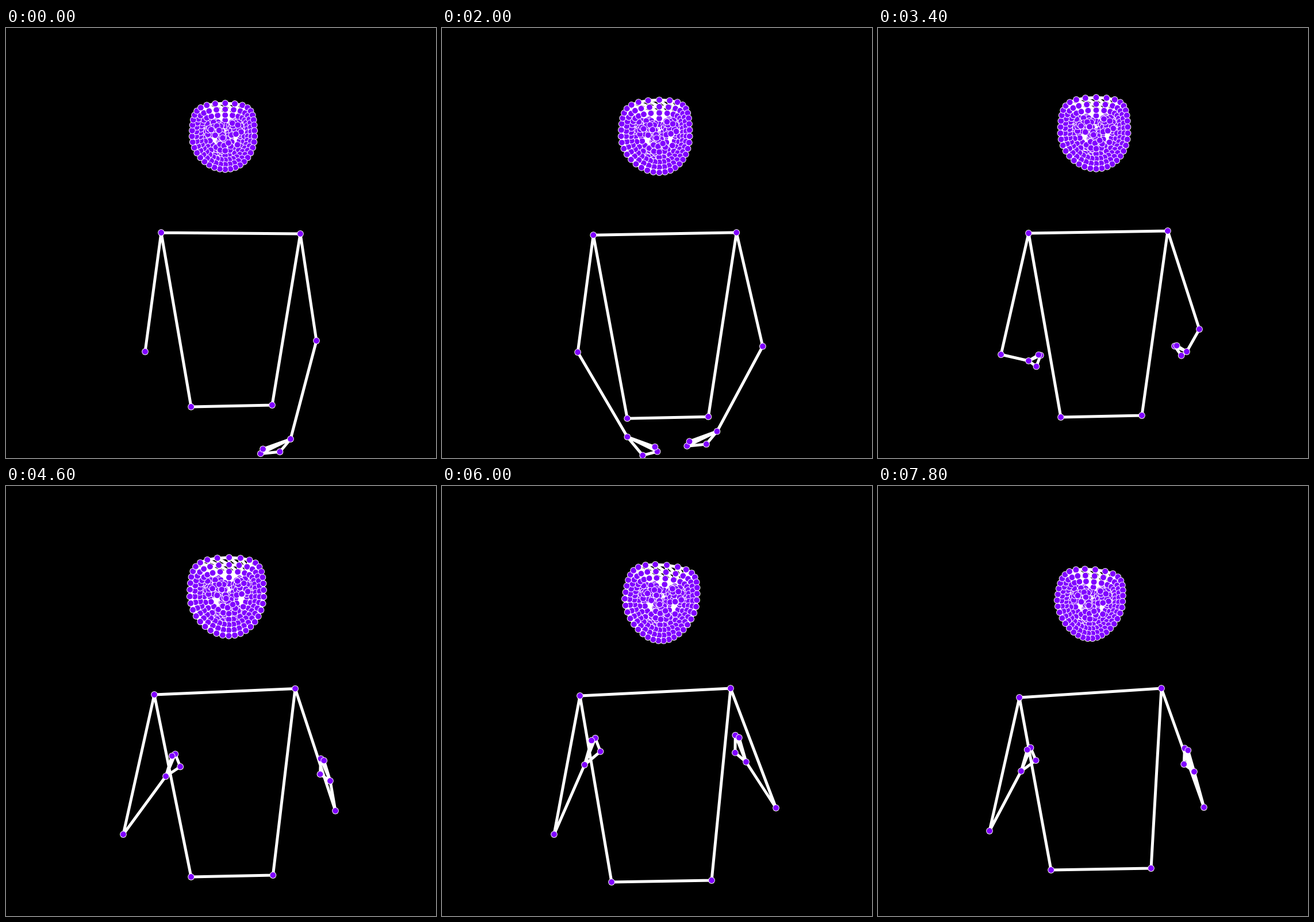
An HTML page with a canvas that plays this animation: 748x748 px, repeating every 8 s.

```html
<!DOCTYPE html>
<html lang="en">
<head>
<meta charset="utf-8">
<title>Body tracking</title>
<style>
  html, body { margin: 0; width: 100%; height: 100%; overflow: hidden; background: #000; }
  canvas { display: block; }
</style>
</head>
<body>
<canvas id="stage" width="748" height="748"></canvas>
<script>
const SIZE = 748, LOOP = 8, STEP = .2;
const ctx = document.getElementById('stage').getContext('2d');
ctx.lineCap = ctx.lineJoin = 'round';

// A path runs straight through a few keys: seconds, then values
const path = (...keys) => t => {
  const next = keys.findIndex(key => key[0] > t);
  if (next < 0) return keys.at(-1).slice(1);
  const a = keys[next - 1], b = keys[next], k = (t - a[0]) / (b[0] - a[0]);
  return a.slice(1).map((v, i) => v + (b[i + 1] - v) * k);
};
const ease = (t, from, to) => {
  const k = Math.min(1, Math.max(0, (t - from) / (to - from)));
  return k * k * (3 - 2 * k);
};
const polar = (length, degrees) => {
  const a = degrees * Math.PI / 180;
  return [length * Math.cos(a), length * Math.sin(a)];
};
const add = (p, [x, y], side = 1) => [p[0] + side * x, p[1] + y];

const shoulderLeft = path([0, 270, 356], [1.2, 264, 362], [3.4, 262, 357], [4.6, 258, 363], [6, 240, 365], [7.8, 246, 368]);
const shoulderRight = path([0, 512, 358], [1.2, 510, 353], [2.6, 514, 358], [3.4, 504, 353], [6, 502, 352], [7.8, 493, 352]);
const hipLeft = path([0, 322, 659], [1.2, 320, 662], [2.6, 324, 692], [3.4, 318, 677], [4.6, 322, 680], [6, 295, 689], [7.2, 298, 686], [7.8, 301, 668]);
const elbowLeft = path([0, 242, 563], [1.2, 243, 572], [2.6, 231, 558], [3.4, 214, 568], [4.6, 204, 606], [6, 195, 606], [7.8, 194, 600]);
const elbowRight = path([0, 540, 544], [1.2, 543, 548], [2.6, 569, 558], [3.4, 559, 524], [4.6, 573, 565], [6, 581, 560], [7.8, 567, 559]);
const wristLeft = path([0, 292, 764], [1.2, 307, 745], [2.6, 334, 686], [3.4, 262, 579], [4.6, 278, 505], [6, 248, 485], [7.8, 249, 496]);
const wristRight = path([0, 495, 715], [1.2, 483, 728], [2.6, 475, 682], [3.4, 537, 563], [4.6, 564, 513], [6, 529, 480], [7.8, 550, 497]);
// Length and angle of both hands
const handPose = path([0, 58, 26], [2.6, 58, 26], [3.4, 23, -25], [4.6, 42, -67], [6, 50, -68], [7.8, 44, -68]);
// Centre and half height
const headPose = path([0, 378, 188.5, 57.5], [1.2, 366, 193.5, 65], [2.6, 375, 184.5, 61.5], [3.4, 376, 183, 62], [4.6, 384, 192.5, 68], [6, 380, 203, 66], [7.8, 368, 205, 60]);

const inside = p => p[1] < SIZE;

function disc([x, y], r, color) {
  ctx.fillStyle = color;
  ctx.beginPath();
  ctx.arc(x, y, r, 0, 2 * Math.PI);
  ctx.fill();
}

function dot(p, color = '#8000ff') {
  if (!inside(p)) return;
  disc(p, 5.9, '#fff');
  disc(p, 4.9, color);
}

function links(list, color = '#fff') {
  ctx.strokeStyle = color;
  ctx.lineWidth = 5;
  ctx.beginPath();
  for (const [a, b] of list) {
    if (!inside(a) || !inside(b)) continue;
    ctx.moveTo(...a);
    ctx.lineTo(...b);
  }
  ctx.stroke();
}

const chain = points => points.slice(1).map((p, i) => [points[i], p]);

// Face in unit coordinates: a broad forehead above, a round jaw below
const range = (n, make) => Array.from({ length: n }, (_, i) => make(i));
const ovalRing = (scale, count) => range(count, i => {
  const a = 2 * Math.PI * i / count, s = Math.sin(a), c = Math.cos(a);
  return c > 0
    ? [scale * Math.tanh(1.75 * s) / Math.tanh(1.75), -c * scale ** 1.6]
    : [scale * s, -c * scale ** 1.2];
});

let seed = 7;
const random = () => (seed = seed * 16807 % 2147483647) / 2147483647;
const jitter = () => (random() - .5) * .06;

const outerRings = [1, .88, .76].map(s => ovalRing(s, 36));
const innerPoints = [...ovalRing(.64, 24), ...ovalRing(.5, 20)];
const feature = (x, y, rx, ry, count) => {
  for (const k of [1, .78, .56, .34]) {
    innerPoints.push(...range(count, i => {
      const [c, s] = polar(k, 360 * (i + .3) / count);
      return [x + rx * c + jitter(), y + ry * s + jitter()];
    }));
  }
};
feature(-.39, -.25, .32, .21, 16);
feature(.39, -.25, .32, .21, 16);
feature(0, .12, .2, .2, 11);
feature(0, .47, .4, .25, 20);
for (let i = innerPoints.length - 1; i > 0; i--) {
  const j = Math.floor(random() * (i + 1));
  [innerPoints[i], innerPoints[j]] = [innerPoints[j], innerPoints[i]];
}

function drawFace(t) {
  const [cx, cy, ry] = headPose(t), rx = ry * .945;
  const yaw = .06 + .14 * ease(t, 0, 1.2) * (1 - ease(t, 1.2, 2.6));
  const roll = .11 * ease(t, 4.4, 6), taper = .02 + .13 * ease(t, 3.8, 6);
  const cos = Math.cos(roll), sin = Math.sin(roll);
  const place = ([u, v]) => {
    const x = (u * (1 - taper * Math.max(v, 0)) + yaw * (1 - u * u)) * rx, y = v * ry;
    return [cx + x * cos - y * sin, cy + x * sin + y * cos];
  };
  const rings = outerRings.map(ring => ring.map(place));

  ctx.fillStyle = '#fff';
  ctx.beginPath();
  rings[2].forEach(p => ctx.lineTo(...p));
  ctx.fill();

  const mesh = [];
  rings.forEach((ring, r) => ring.forEach((p, i) => {
    const j = (i + 1) % ring.length, deeper = rings[r + 1];
    mesh.push([p, ring[j]]);
    if (deeper) mesh.push([p, deeper[i]], [p, deeper[j]]);
  }));
  links(mesh);

  innerPoints.forEach(p => dot(place(p)));
  rings.reverse().flat().forEach(p => dot(p));
}

// Detailed hand: a curling thumb and four bent fingers on an even row of knuckles
function drawTrackedHand(wrist) {
  const root = add(wrist, [10, -12]);
  const thumb = [root];
  for (let j = 0; j < 4; j++) thumb.push(add(thumb[j], polar(42 - 8 * j, 174 - 20 * j).map((v, i) => i ? -v + 2 * polar(42 - 8 * j, 174 - 20 * j)[1] * (j === 0 ? 0 : 1) : v)));
  const fingers = range(4, n => {
    const joints = [add(root, [-76 + 18.3 * n, 32 + 8 * n])], size = 1 - .08 * n;
    for (let j = 0; j < 3; j++) joints.push(add(joints[j], [-23 * size * .65 ** j, 21 * size * .3 ** j]));
    return joints;
  });
  const knuckles = fingers.map(f => f[0]);
  links([...chain(thumb), ...fingers.flatMap(chain), ...chain([root, ...knuckles, root])], '#f00');
  [...thumb, ...fingers.flat()].forEach(p => dot(p, '#ff0'));
}

// Pinky, index and thumb; a foreshortened hand spreads wider
function handTips(t, wrist, side) {
  const [length, angle] = handPose(t);
  const tip = (reach, turn) => add(wrist, polar(length * reach, angle + turn), side);
  return [tip(side > 0 ? .72 : .5, 1400 / length), tip(1, 0), tip(.88, -6)];
}

function drawBody(t) {
  const hipL = hipLeft(t), hipR = add(hipL, [141 + 33 * ease(t, 4.4, 6), -3]);
  const arms = [
    [shoulderLeft(t), elbowLeft(t), wristLeft(t), hipL, 1],
    [shoulderRight(t), elbowRight(t), wristRight(t), hipR, -1]
  ];
  if (t > 2.3 && t < 2.9) drawTrackedHand(arms[1][2]);

  const lines = [[arms[0][0], arms[1][0]], [hipL, hipR]], dots = [];
  for (const [shoulder, elbow, wrist, hip, side] of arms) {
    const tips = handTips(t, wrist, side);
    lines.push([shoulder, hip], ...chain([shoulder, elbow, wrist]), [tips[0], tips[1]]);
    lines.push(...tips.map(p => [wrist, p]));
    dots.push(shoulder, elbow, wrist, ...tips, hip);
  }
  links(lines);
  dots.forEach(p => dot(p));
}

let shown = -1;
const start = performance.now();
function tick() {
  const step = Math.floor((performance.now() - start) / 1000 % LOOP / STEP);
  if (step !== shown) {
    shown = step;
    ctx.fillStyle = '#000';
    ctx.fillRect(0, 0, SIZE, SIZE);
    drawFace(step * STEP);
    drawBody(step * STEP);
  }
  requestAnimationFrame(tick);
}
tick();
</script>
</body>
</html>
```
